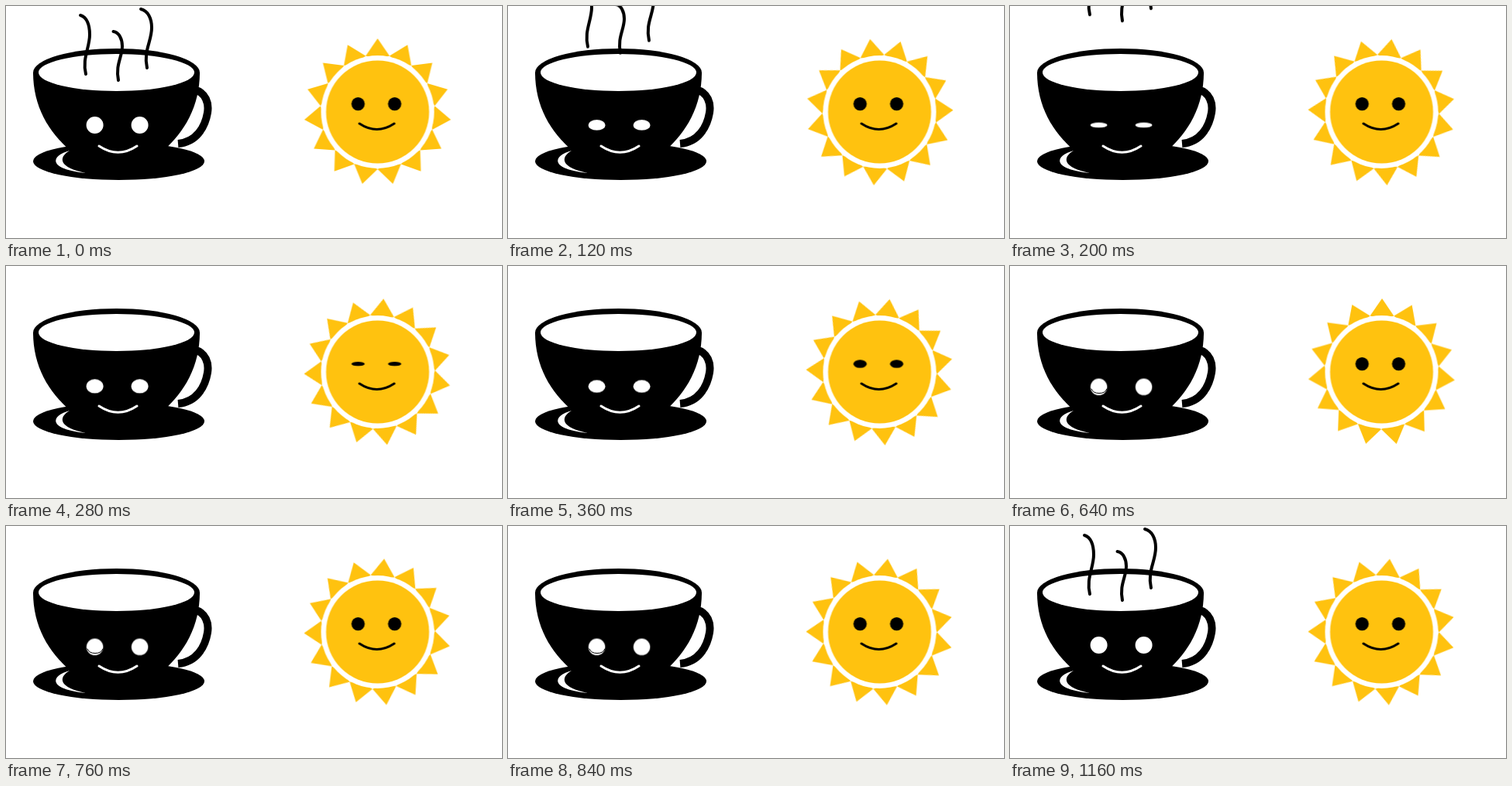
Animation, 640 px wide and 300 px high, one loop 1.2 s. Source, as an HTML page without scripts:

```html
<!DOCTYPE html>
<html lang="en">
<head>
<meta charset="utf-8">
<title>Cup and sun</title>
<style>
  html, body { margin: 0; width: 100%; height: 100%; overflow: hidden; background: #fff; }
  svg { display: block; width: 100vw; height: 100vh; }
  .line { fill: none; stroke: #000; stroke-width: 3; stroke-linecap: round; }
  .steam { stroke-width: 4; animation: rise 1.2s infinite ease-in-out; }
  .rays { animation: sway 1.2s infinite ease-in-out; }
  .eye { transform-box: fill-box; transform-origin: center; }
  .cup-eye { fill: #fff; animation: cup-blink 1.2s infinite linear; }
  .sun-eye { animation: sun-blink 1.2s infinite linear; }
  .lid { stroke-width: 1; animation: lid 1.2s infinite step-end; }

  @keyframes rise {
    0% { transform: none; visibility: visible; }
    23.32% { transform: translateY(-92px); visibility: visible; }
    23.33%, 96.66% { transform: translateY(-92px); visibility: hidden; }
    96.666%, 100% { transform: none; visibility: visible; }
  }
  @keyframes sway {
    0% { transform: rotate(0deg); }
    23.333% { transform: rotate(-19.4deg); }
    46.667% { transform: rotate(-.9deg); }
    70%, 100% { transform: rotate(6.3deg); }
  }
  @keyframes cup-blink {
    0% { transform: none; animation-timing-function: ease-in; }
    10% { transform: scaleY(.63); }
    20% { transform: scaleY(.15); }
    23.32% { transform: translateY(1.5px) scaleY(.84); }
    40% { transform: translateY(2px) scaleY(.61); }
    43.3% { transform: translateY(2px) scaleY(.6); }
    46.66%, 96.66% { transform: translateY(2.3px) scale(.98); }
    96.666%, 100% { transform: none; }
  }
  @keyframes sun-blink {
    0%, 20% { transform: none; }
    23.33% { transform: scaleY(.32); animation-timing-function: ease-in-out; }
    38%, 100% { transform: none; }
  }
  @keyframes lid {
    0% { visibility: hidden; }
    46.66% { visibility: visible; }
    96.666%, 100% { visibility: hidden; }
  }
</style>
</head>
<body>
<svg viewBox="0 0 640 300">
  <defs>
    <path id="ray" d="M0-95 15.4-72.4 0-68-15.4-72.4Z"/>
    <g id="fan">
      <use href="#ray"/>
      <use href="#ray" transform="rotate(24)"/>
      <use href="#ray" transform="rotate(48)"/>
    </g>
  </defs>

  <g id="cup">
    <ellipse cx="145.5" cy="200.8" rx="110.5" ry="24.2"/>
    <path fill="#fff" d="M82 187C57 194 54 211 103 216C68 209 67 196 82 187Z"/>
    <path class="line" style="stroke-width:10;stroke-linecap:butt" d="M243 108C258 112 262 126 260 138C257 156 246 176 222 178"/>
    <path d="M35 86C35 130 55 163 83 187H203C230 163 250 130 250 86Z"/>
    <ellipse cx="142.5" cy="86" rx="107.5" ry="31"/>
    <ellipse cx="142.5" cy="86" rx="100.5" ry="24" fill="#fff"/>
    <circle class="eye cup-eye" cx="114.6" cy="154" r="11"/>
    <circle class="eye cup-eye" cx="172.6" cy="154" r="11"/>
    <path class="line lid" d="M105 159a10.5 8 0 0 0 20 0"/>
    <path class="line" style="stroke:#fff" d="M120 181Q144.5 197.5 169 181"/>
  </g>

  <g class="line steam">
    <path d="M96 12C104 14 108 24 108 37C108 54 98 68 103 88"/>
    <path d="M138.5 33C146 34 150 43 150 52C150 66 141 76 145 96"/>
    <path d="M174 4C183 6 188 16 188 28C188 46 177 58 182 80"/>
  </g>

  <g id="sun" transform="translate(479.5 137)">
    <g class="rays" fill="#ffc20f">
      <use href="#fan"/>
      <use href="#fan" transform="rotate(72)"/>
      <use href="#fan" transform="rotate(144)"/>
      <use href="#fan" transform="rotate(216)"/>
      <use href="#fan" transform="rotate(288)"/>
    </g>
    <circle r="73" fill="#fff"/>
    <circle r="66.5" fill="#ffc20f"/>
    <circle class="eye sun-eye" cx="-25.2" cy="-10.4" r="8.6"/>
    <circle class="eye sun-eye" cx="22" cy="-10.4" r="8.6"/>
    <path class="line" d="M-23.5 15Q-1 30 21.5 15"/>
  </g>
</svg>
</body>
</html>
```
